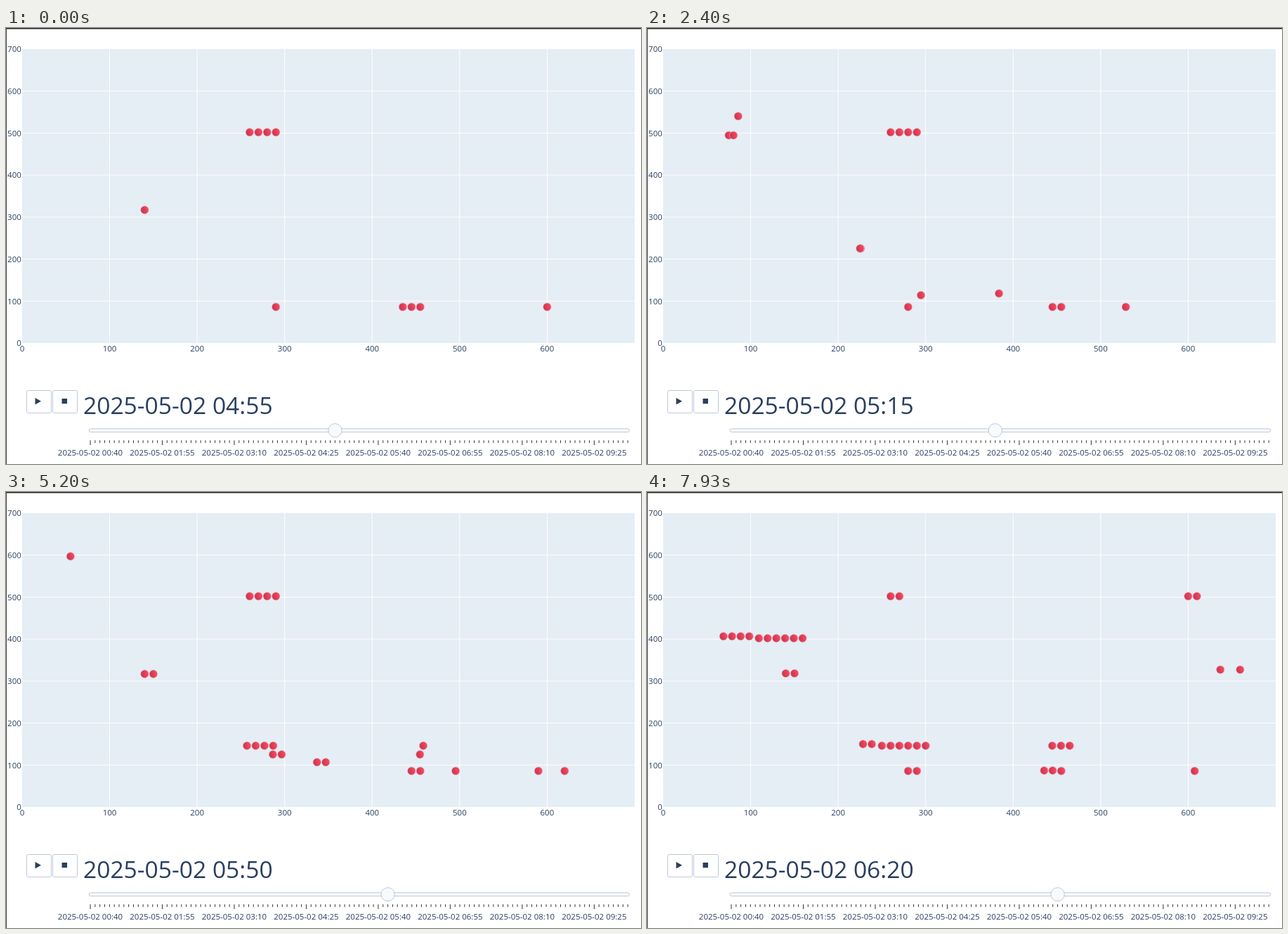
These frames come from a looping animation (904x620 px, 8000 ms). An HTML page:

```html
<!DOCTYPE html>
<html lang="en">
<head>
<meta charset="utf-8">
<title>Event animation</title>
<style>
  html, body { margin: 0; width: 100%; height: 100%; overflow: hidden; background: #fff; }
  svg { display: block; }
  text { font: 11.5px "Open Sans", sans-serif; fill: #2a3f5f; }
  #clock { font-size: 33.6px; }
  .box { fill: #fff; stroke: #bec8d9; }
  .grid { stroke: #fff; }
  .tick { stroke: #333; }
</style>
</head>
<body>
<svg id="stage" width="904" height="620" viewBox="0 0 904 620">
  <defs>
    <clipPath id="plot"><rect x="23" y="30" width="872" height="418"/></clipPath>
    <linearGradient id="red" x1="0" y1="0.65" x2="1" y2="0.35">
      <stop offset="0" stop-color="#c23650"/>
      <stop offset="0.4" stop-color="#e03a54"/>
      <stop offset="1" stop-color="#fa4c63"/>
    </linearGradient>
  </defs>
  <rect width="904" height="1.5" fill="#222"/>
  <rect width="1" height="620" fill="#444"/>
  <rect x="23" y="30" width="872" height="418" fill="#e5edf5"/>
  <g id="axes"></g>
  <g id="dots" clip-path="url(#plot)"></g>
  <rect class="box" x="29.5" y="515.5" width="35" height="32" rx="2"/>
  <rect class="box" x="66.5" y="515.5" width="35" height="32" rx="2"/>
  <path d="M41.5 526V535.5L50 530.7ZM79.5 527h7.5v7.2h-7.5Z" fill="#2a3f5f"/>
  <text id="clock" x="110" y="549"></text>
  <rect class="box" x="118.2" y="569.8" width="769.4" height="4.8" rx="2.4" style="fill:#f8fafc"/>
  <g id="ticks"></g>
  <circle id="grip" cy="572.2" r="9.6" style="fill:#f8fafc" class="box"/>
</svg>
<script>
const LOOP = 8000, START = 947, STEP = 411.2, SLIDE = 150;
const FIRST_TICK = 120, TICK_GAP = 6.832;

// Rows of places: x of place 0, distance between places, y (in data units)
const rows = {
  s: [0, 0, 700], a: [160, -10, 402], b: [140, 10, 317], f: [300, -10, 146],
  c: [280, 10, 86], h: [465, -10, 146], d: [435, 10, 86], e: [590, 10, 86],
  k: [260, 10, 502], g: [600, 10, 502], x: [660, -10, 331],
};
const initial = "b0 k0 k1 k2 k3 c1 d0 d1 d2 e1";

// Moves per five minutes; *n moves n neighbours. s is the entrance, x the exit.
const steps = [
  "s0>b1 s0>c0 c1>d0 d0>e0",
  "b0>f0 b1>c1 s0>b0*2 d1>e3 e1>x2",
  "c0>d1 f0>c0 b0>f0 s0>b0 e0>x1 e3>x0",
  "c1>h0 f0>c1 b0>f0*2 d0>e2 s0>b0*2 s0>a0",
  "h0>d0 c0>h0 f0>c0 f1>f0 b0>f1 a0>b0 s0>a0*3",
  "a2>a0 a1>b0 a0>b1 b0>f2 b1>f1 f1>f0 f0>c1 c1>h0 h0>d2 d2>x0 e2>x1",
  "d0>x0 h0>d0 c0>h0 f0>c0 f1>f0*2 b0>f2*2 a0>b1 s0>b0",
  "s0>f4 b0>f3 b1>f2 f2>f0*2 f1>c0 f0>c1 c0>h1 c1>h0 h0>d0 d0>e1",
  "s0>b0*2 e1>x0 d1>e0 h0>d1 h1>h0 c0>h1 f0>c0 f1>f0*4 s0>f4",
  "d1>e3 h0>d1 h1>h0 c0>h1 f0>c0 f1>f0*4 b0>f4*2 s0>b0*2",
  "s0>a0 f2>f0*4 f1>c0 f0>c1 c0>h2 c1>h1 h1>h0 h0>d0 d0>e2",
  "k3>g1 e3>x0 d1>e1 h0>d1 h1>h0*2 c0>h2 f0>c0 f1>f0*3 a0>f3 b0>f4 s0>b0 s0>a0*2",
  "b0>f5 a0>b0 a1>a0 s0>a1",
  "s0>a0*4 a1>b0 a0>f6 b0>f5 f1>f0*5 f0>c1 c1>h2 h1>h0*2 h0>d0 d0>e3 e2>x1",
  "k2>g0 f0>c0*2 c0>h3*2 f2>f0*5 b0>f5*2 e0>x1 s0>a4*3",
  "f0>c1 f1>f0*6 c1>h4 h1>h0*4 h0>d0 d0>x0 e1>x1 s0>a7*3",
  "a0>b1 a1>b0 a2>f6*2 a4>a0*6 s0>a6*4 h0>d0*2 h2>h0*3 d1>e2 d0>x2 e3>x0",
];

const byId = id => document.getElementById(id);
const toX = v => 23 + v * 872 / 700;
const toY = v => 448 - v * 418 / 700;
const mix = (a, b, p) => a + (b - a) * p;
const cubicInOut = p => p < 0.5 ? 4 * p ** 3 : 1 - 4 * (1 - p) ** 3;

function add(parent, tag, attributes, content = "") {
  const node = document.createElementNS("http://www.w3.org/2000/svg", tag);
  for (const name in attributes) node.setAttribute(name, attributes[name]);
  node.textContent = content;
  return byId(parent).appendChild(node);
}

function stamp(minutes) {
  const two = n => String(n).padStart(2, "0");
  return `2025-05-02 ${two(Math.floor(minutes / 60))}:${two(minutes % 60)}`;
}

function place(name) {
  const [x, gap, y] = rows[name[0]];
  return [toX(x + gap * name[1]), toY(y)];
}

function parseMoves(line) {
  return line.split(" ").flatMap(move => {
    const [, from, i, to, j, count = 1] = move.match(/(\w)(\d)>(\w)(\d)(?:\*(\d))?/);
    return Array.from({ length: +count }, (_, n) => [from + (+i + n * (from !== "s")), to + (+j + n)]);
  });
}

let occupied = initial.split(" ");
const transitions = steps.map(line => {
  const moves = parseMoves(line);
  const leaving = new Set(moves.map(move => move[0]));
  const all = occupied.filter(name => !leaving.has(name)).map(name => [name, name]).concat(moves);
  occupied = all.map(move => move[1]).filter(name => name[0] !== "x");
  return all.map(move => move.map(place));
});

for (let v = 0; v <= 700; v += 100) {
  const x = toX(v), y = toY(v);
  if (v > 0 && v < 700) {
    add("axes", "path", { class: "grid", d: `M${x} 30V448M23 ${y}H895` });
  }
  if (v < 700) add("axes", "text", { x, y: 460.3, "text-anchor": "middle" }, v);
  add("axes", "text", { x: 21.8, y: y + 4.3, "text-anchor": "end" }, v);
}

for (let i = 0; i <= 112; i++) {
  const x = FIRST_TICK + i * TICK_GAP, major = i % 15 === 0;
  add("ticks", "path", { class: "tick", d: `M${x} 586.3v${major ? 6.7 : 3.8}` });
  if (major) add("ticks", "text", { x, y: 607.7, "text-anchor": "middle" }, stamp(40 + i * 5));
}

const dots = Array.from({ length: Math.max(...transitions.map(t => t.length)) }, () =>
  add("dots", "circle", { r: 5.7, fill: "url(#red)", stroke: "#d8c3cc", "stroke-width": 0.6 }));

function draw(time) {
  const progress = Math.min(Math.max((time - START) / STEP, 0), steps.length);
  const index = Math.min(Math.floor(progress), steps.length - 1);
  const part = progress - index;
  const moves = transitions[index];

  dots.forEach((dot, i) => {
    // Entrances stay hidden until the first step begins
    const shown = i < moves.length && (progress > 0 || moves[i][0][0] > 23);
    dot.style.display = shown ? "" : "none";
    if (!shown) return;
    const [from, to] = moves[i];
    dot.setAttribute("cx", mix(from[0], to[0], part));
    dot.setAttribute("cy", mix(from[1], to[1], part));
  });

  const started = progress > 0 ? 1 : 0;
  const slide = started * cubicInOut(Math.min(part * STEP / SLIDE, 1));
  byId("clock").textContent = stamp(295 + 5 * (index + started));
  byId("grip").setAttribute("cx", FIRST_TICK + TICK_GAP * (51 + index + slide));
}

function tick() {
  draw(performance.now() % LOOP);
  requestAnimationFrame(tick);
}
tick();
</script>
</body>
</html>
```
